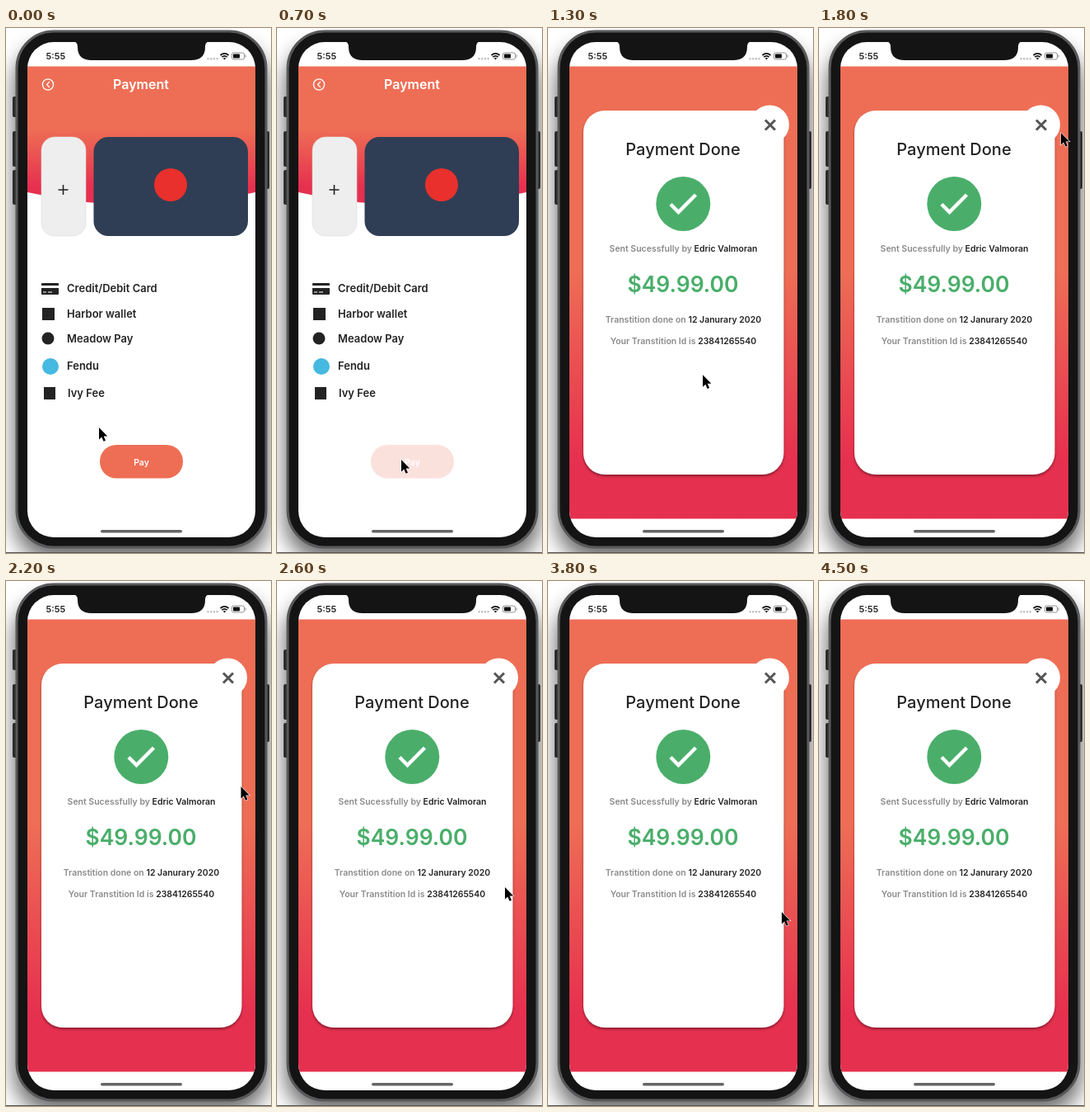
Recreate the animation shown at these times as an HTML page. Size 322 px wide and 636 px high, loop 4.6 s.

```html
<!DOCTYPE html>
<html lang="en">
<head>
<meta charset="utf-8">
<title>Payment</title>
<style>
  html, body { margin: 0; width: 100%; height: 100%; overflow: hidden; background: #fff; }
  svg { display: block; width: 100vw; height: 100vh; }
  text { font-family: Inter, Roboto, sans-serif; font-weight: 600; fill: #232323; }
  .mid { text-anchor: middle; }
  .list { font-size: 13px; }
  .note { font-size: 10.5px; fill: #8a8a8a; }
  .note tspan { fill: #232323; }
  .line { fill: none; stroke-linecap: round; stroke-linejoin: round; }
</style>
</head>
<body>
<svg viewBox="0 0 322 636">
  <defs>
    <linearGradient id="warm" x2="0" y2="1">
      <stop offset=".45" stop-color="#ee6e55"/>
      <stop offset=".87" stop-color="#e6304f"/>
    </linearGradient>
    <filter id="blur" x="-30%" y="-30%" width="160%" height="160%"><feGaussianBlur stdDeviation="13"/></filter>
    <filter id="soft"><feGaussianBlur stdDeviation="1.5"/></filter>
    <clipPath id="glass"><rect x="26" y="17" width="277" height="600" rx="32"/></clipPath>
  </defs>

  <!-- phone body -->
  <rect x="10" y="22" width="309" height="622" rx="46" opacity=".6" filter="url(#blur)"/>
  <path d="M0 635.5H322" stroke="#555"/>
  <g fill="#2b2b2c">
    <rect x="8" y="83" width="7" height="25" rx="2"/>
    <rect x="8" y="125" width="7" height="43" rx="2"/>
    <rect x="8" y="172" width="7" height="42" rx="2"/>
    <rect x="313" y="125" width="7" height="70" rx="2"/>
  </g>
  <rect x="13" y="4" width="303" height="625" rx="45" fill="#141415" stroke="#58595b" stroke-width="3"/>
  <rect x="26" y="17" width="277" height="600" rx="32" fill="#fff"/>

  <g clip-path="url(#glass)">
    <g id="form">
      <path d="M26 46.5H303V199Q164 230 26 199Z" fill="url(#warm)"/>
      <g class="line" stroke="#fff" stroke-width="1.4">
        <circle cx="51" cy="68.5" r="6.6"/>
        <path d="M52.5 65.5l-3 3 3 3"/>
      </g>
      <text class="mid" x="164" y="74" font-size="16" style="fill:#fff">Payment</text>

      <rect x="43" y="132" width="54" height="120" rx="16" fill="#eee" stroke="#dcdcdc" stroke-width=".6"/>
      <path d="M63.5 196h12M69.5 190v12" stroke="#222" stroke-width="1.6"/>
      <rect x="106.5" y="132" width="187.5" height="120" rx="18" fill="#2f3e55"/>
      <circle cx="200" cy="190" r="20" fill="#e9302c"/>

      <g fill="#232323">
        <path d="M44 309h19q1 0 1 1v2H43v-2q0-1 1-1zM43 315h21v7q0 1-1 1H44q-1 0-1-1z"/>
        <path d="M45 320h4M51 320h5" stroke="#fff"/>
        <rect x="44" y="339" width="15" height="15"/>
        <circle cx="51" cy="376" r="7.5"/>
        <circle cx="54" cy="410" r="10" fill="#45b9e0"/>
        <rect x="46" y="435" width="14" height="15"/>
      </g>
      <g class="list">
        <text x="74" y="320">Credit/Debit Card</text>
        <text x="74" y="351">Harbor wallet</text>
        <text x="74" y="381">Meadow Pay</text>
        <text x="74" y="414">Fendu</text>
        <text x="75" y="447">Ivy Fee</text>
      </g>
      <g id="pay">
        <rect x="114" y="505" width="101" height="40.5" rx="20" fill="#ee6e55"/>
        <text class="mid" x="164.5" y="530" font-size="10.5" style="fill:#fff">Pay</text>
      </g>
    </g>

    <g id="done">
      <rect x="26" y="46.5" width="277" height="548" fill="url(#warm)"/>
      <rect x="43" y="102" width="243.5" height="441" rx="26" opacity=".4" filter="url(#soft)"/>
      <rect x="43" y="100" width="243.5" height="441" rx="26" fill="#fff"/>
      <circle cx="269.5" cy="117" r="23.5" fill="#fff"/>
      <path d="M264 111.500l12 12m0-12l-12 12" stroke="#555" stroke-width="3"/>
      <text class="mid" x="164" y="154" font-size="20" style="font-weight:500">Payment Done</text>
      <circle cx="164.300" cy="213" r="33" fill="#4aae6a"/>
      <path d="M149 213.500l9.500 9.500 21-21" fill="none" stroke="#fff" stroke-width="4.500"/>
      <text class="mid note" x="164.500" y="271">Sent Sucessfully by <tspan>Edric Valmoran</tspan></text>
      <text class="mid" x="164" y="320" font-size="26.500" style="fill:#4aae6a">$49.99.00</text>
      <text class="mid note" x="164.500" y="356.500">Transtition done on <tspan>12 Janurary 2020</tspan></text>
      <text class="mid note" x="164.500" y="383">Your Transtition Id is <tspan>23841265540</tspan></text>
    </g>

    <!-- status bar and home bar -->
    <path d="M80 16q7 0 7 7q0 16 17 16h121q17 0 17-16q0-7 7-7z" fill="#141415"/>
    <text x="48.500" y="38" font-size="11">5:55</text>
    <path class="line" d="M245.500 37.200h12" stroke="#bbb" stroke-width="2.400" stroke-dasharray="0 3.700"/>
    <g class="line" stroke="#111" stroke-width="1.700" style="stroke-linecap:butt">
      <path d="M260.500 33q5-4.300 10 0M262.300 35.200q3.200-2.600 6.400 0"/>
    </g>
    <path d="M263.700 36.600q1.800-1.400 3.600 0l-1.800 2z" fill="#111"/>
    <rect x="274.500" y="30" width="15" height="8" rx="2" fill="none" stroke="#888" stroke-width=".9"/>
    <rect x="276" y="31.500" width="8" height="5" rx=".8" fill="#111"/>
    <path d="M291 32.500v3" stroke="#888"/>
    <rect x="115" y="608" width="99" height="3.500" rx="1.700" fill="#666"/>
  </g>

  <path id="cursor" d="M0 0V14.500l3.300-3.100 2.300 5.300 2.400-1-2.300-5.200h4.600z" fill="#000" stroke="#fff" stroke-width="1.100" paint-order="stroke"/>
</svg>
<script>
const LOOP = 4600, STEP = 100;
const $ = id => document.getElementById(id);

// time, x, y of the pointer tip
const path = [
  [0, 113, 484], [500, 151, 523], [1100, 151, 523], [1700, 294, 127],
  [1900, 294, 127], [2500, 277, 371], [2700, 277, 371], [3100, 284, 401], [LOOP, 284, 401]
];
const ease = k => k * k * (3 - 2 * k);
const clamp = k => Math.min(1, Math.max(0, k));

function pointer(t) {
  const i = path.findIndex(p => p[0] > t);
  const [t0, x0, y0] = path[i - 1], [t1, x1, y1] = path[i];
  const k = ease((t - t0) / (t1 - t0));
  return [x0 + (x1 - x0) * k, y0 + (y1 - y0) * k];
}

function draw(now) {
  const t = Math.floor(now % LOOP / STEP) * STEP;
  const paid = t >= 800;
  $('form').style.display = paid ? 'none' : '';
  $('done').style.display = paid ? '' : 'none';
  $('pay').setAttribute('opacity', 1 - 0.8 * clamp((t - 500) / 200));
  $('cursor').style.display = t < 4400 ? '' : 'none';
  $('cursor').setAttribute('transform', `translate(${pointer(t)})`);
}

const start = performance.now();
function tick() {
  draw(performance.now() - start);
  requestAnimationFrame(tick);
}
tick();
</script>
</body>
</html>
```
